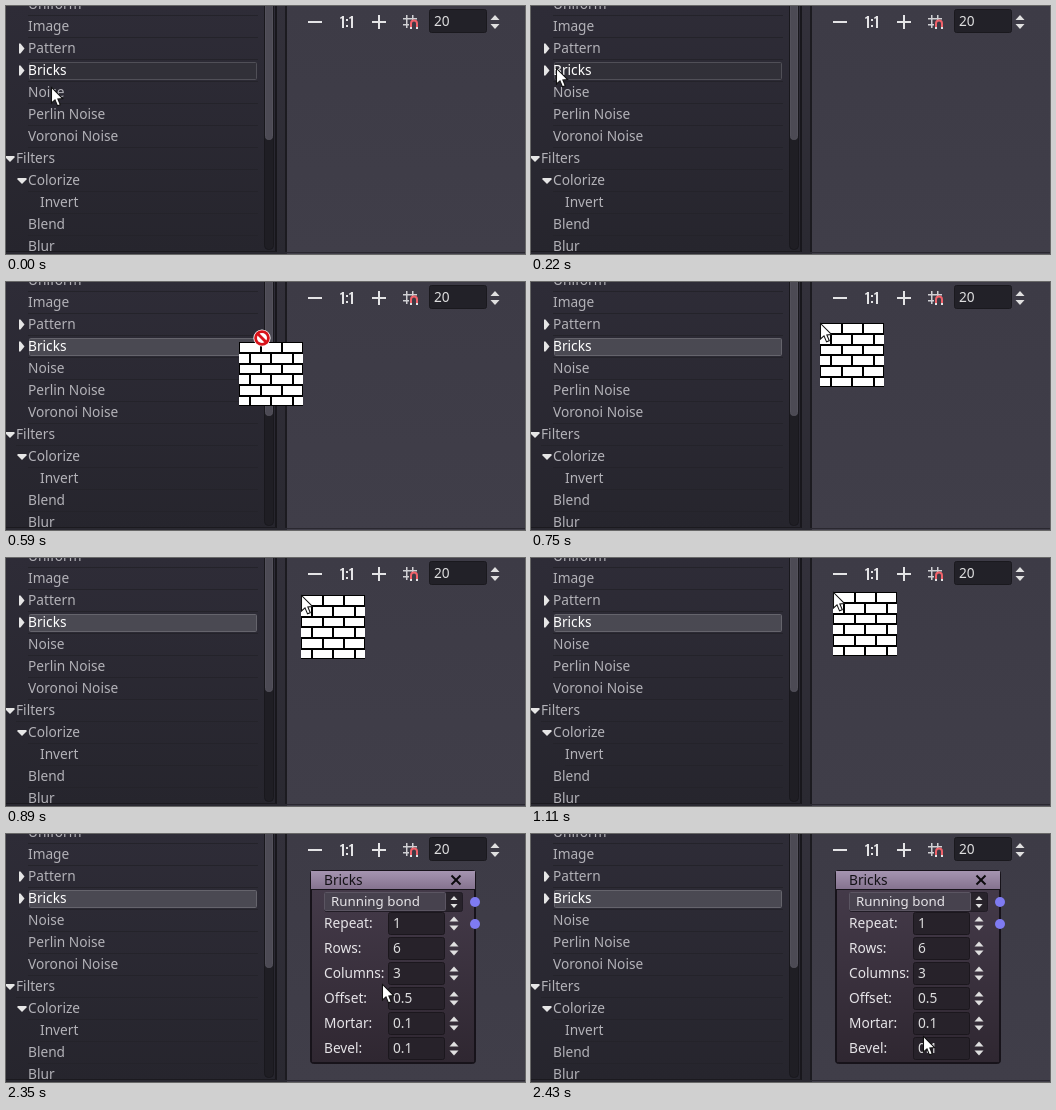
Recreate the animation shown at these times as an HTML page with a canvas. Size 519x248 px, loop 2510 ms.

```html
<!DOCTYPE html>
<html lang="en">
<head>
<meta charset="utf-8">
<title>Drag a node into the graph</title>
<style>
  html, body { margin: 0; width: 100%; height: 100%; overflow: hidden; background: #3d3b46; }
  canvas { display: block; }
</style>
</head>
<body>
<canvas id="stage" width="519" height="248"></canvas>
<script>
const ctx = document.getElementById('stage').getContext('2d');
const LOOP = 2510, SELECT = 450, DRAG = 530, ENTER_GRAPH = 670, DROP = 1650;

// Pointer positions: [start ms, x, y], each held until the next
const pointer = [
  [0, 45.5, 81.5], [80, 24.5, 63.5], [220, 25.5, 62.5], [450, 73.5, 66.5],
  [530, 165, 61], [590, 256, 56], [670, 279.5, 48.5], [750, 289.5, 41.5],
  [830, 292.5, 39.5], [890, 295.5, 37.5], [970, 298.5, 36.5], [1050, 300.5, 35.5],
  [1110, 302.5, 34.5], [2350, 376.5, 150.5], [2430, 392.5, 202.5]
];

// Tree rows: [label, text x, arrow]
const tree = [
  ['Uniform', 22], ['Image', 22], ['Pattern', 22, 'closed'], ['Bricks', 22, 'closed'],
  ['Noise', 22], ['Perlin Noise', 22], ['Voronoi Noise', 22], ['Filters', 10, 'open'],
  ['Colorize', 22, 'open'], ['Invert', 34], ['Blend', 22], ['Blur', 22]
];

const params = [['Repeat:', 1], ['Rows:', 6], ['Columns:', 3], ['Offset:', 0.5], ['Mortar:', 0.1], ['Bevel:', 0.1]];

function rect(x, y, w, h, fill) {
  ctx.fillStyle = fill;
  ctx.fillRect(x, y, w, h);
}

function box(x, y, w, h, fill, border, radius = 2) {
  ctx.beginPath();
  ctx.roundRect(x + 0.5, y + 0.5, w - 1, h - 1, radius);
  ctx.fillStyle = fill;
  ctx.fill();
  ctx.strokeStyle = border;
  ctx.lineWidth = 1;
  ctx.stroke();
}

function shade(x0, y0, x1, y1, ...colors) {
  const g = ctx.createLinearGradient(x0, y0, x1, y1);
  colors.forEach((c, i) => g.addColorStop(i / (colors.length - 1), c));
  return g;
}

function text(str, x, y, color, size = 13.7) {
  ctx.font = size + 'px "Noto Sans", sans-serif';
  ctx.fillStyle = color;
  ctx.fillText(str, x, y);
}

function polygon(fill, ...points) {
  ctx.beginPath();
  points.forEach(([x, y]) => ctx.lineTo(x, y));
  ctx.closePath();
  ctx.fillStyle = fill;
  ctx.fill();
}

function line(color, width, ...points) {
  ctx.beginPath();
  points.forEach(([x, y]) => ctx.lineTo(x, y));
  ctx.strokeStyle = color;
  ctx.lineWidth = width;
  ctx.stroke();
}

function disc(x, y, r, fill) {
  ctx.beginPath();
  ctx.arc(x, y, r, 0, 7);
  ctx.fillStyle = fill;
  ctx.fill();
}

function spinner(x, y, gap = 2, size = 4.5) {
  for (const s of [-1, 1])
    polygon('#e0e0e0', [x - size, y + s * gap], [x + size, y + s * gap], [x, y + s * (gap + size + 0.5)]);
}

function drawTree(selected) {
  rect(0, 0, 269, 246, shade(0, 0, 0, 248, '#2e2c37', '#26252d'));
  tree.forEach(([label, x, arrow], i) => {
    const y = i * 22 - 2, active = label === 'Bricks';
    rect(x, y + 11, 252 - x, 1, '#24232a');
    if (active) box(23, y - 8, 228, 18, selected ? '#4a4952' : '#313038', selected ? '#65646c' : '#504f57', 1);
    if (arrow === 'closed') polygon('#e6e6e6', [x - 9, y - 4.5], [x - 7.5, y - 4.5], [x - 3.5, y + 0.5], [x - 7.5, y + 5.5], [x - 9, y + 5.5]);
    if (arrow === 'open') polygon('#e6e6e6', [x - 10.5, y - 2], [x - 1.5, y - 2], [x - 1.5, y - 0.5], [x - 6, y + 4], [x - 10.5, y - 0.5]);
    text(label, x, y + 5, active ? '#ffffff' : '#b3b2b8');
  });
  box(258, -6, 10, 250, '#1f1e24', '#19181d', 4);
  box(259, -6, 8, 140, '#4c4a54', '#53515b', 3);
}

function drawGraph() {
  rect(281, 0, 238, 248, shade(0, 0, 0, 248, '#3d3b46', '#403e49'));
  rect(0, 0, 281, 248, shade(0, 0, 0, 248, '#33313b', '#2a2931'));
  rect(269, 0, 2, 246, '#18171c');
  rect(279, 0, 2, 246, '#1c1b20');
  rect(0, 245, 270, 1, '#1b1a1f');
  rect(281, 246, 238, 1, '#2a2830');
}

function drawToolbar() {
  const white = '#e4e4e6';
  rect(302, 15, 14, 2, white);
  rect(366, 15, 14, 2, white);
  rect(372, 9, 2, 14, white);
  for (const x of [337, 346]) {
    rect(x - 1, 10, 2, 12, white);
    line(white, 1.5, [x - 2.7, 12.3], [x, 10.7]);
  }
  rect(340, 13, 2, 2, white);
  rect(340, 19, 2, 2, white);

  // Grid with a magnet
  rect(400, 9, 1.5, 13, '#d0d0d3');
  rect(406, 9, 1.5, 5, '#d0d0d3');
  rect(397, 12, 14, 1.5, '#d0d0d3');
  rect(397, 18, 6, 1.5, '#d0d0d3');
  ctx.beginPath();
  ctx.moveTo(405, 21);
  ctx.arc(408, 17.5, 3, Math.PI, 0);
  ctx.lineTo(411, 21);
  ctx.strokeStyle = '#f0626a';
  ctx.lineWidth = 2;
  ctx.stroke();
  rect(404, 21, 2, 2, white);
  rect(410, 21, 2, 2, white);

  box(423, 3, 58, 24, '#222128', '#1a191e');
  text('20', 428, 20, '#dededf');
  spinner(489, 16);
}

function drawNode() {
  box(304, 36, 166, 194, '#17131a', '#17131a', 3);
  rect(305, 37, 164, 18, shade(0, 37, 0, 55, '#a594b0', '#85738f'));
  rect(306, 56, 162, 172, shade(0, 56, 0, 228, '#443a49', '#2f2731'));
  text('Bricks', 318, 51, '#131115');
  line('#0c0b0d', 2, [445.5, 41.5], [454.5, 50.5]);
  line('#0c0b0d', 2, [454.5, 41.5], [445.5, 50.5]);

  box(318, 58, 139, 20, '#28232b', '#211c25');
  box(318, 58, 122, 19, '#47424e', '#5b5562', 1);
  text('Running bond', 325, 72, '#e6e4e8', 13.3);
  spinner(448, 68, 2, 3.5);

  params.forEach(([label, value], i) => {
    const y = 89 + i * 25;
    text(label, 318, y + 5, '#e6e4e8');
    box(382, y - 11, 57, 23, '#27222a', '#1b171d');
    text(value, 387, y + 5, '#dededf');
    spinner(448, y + 0.5, 2, 4.5);
  });
  for (const y of [68, 90]) disc(469, y, 5, '#7f7bf2');
}

function drawBricks(x, y) {
  const w = 64 / 3, h = 64 / 6;
  // Brick faces snap to whole pixels, leaving the mortar crisp
  const face = (from, size) => {
    const a = Math.round(from + 1.2);
    return [a, Math.round(from + size - 0.7) - a];
  };
  ctx.save();
  ctx.translate(Math.floor(x), Math.floor(y));
  ctx.beginPath();
  ctx.rect(0, 0, 64, 64);
  ctx.clip();
  rect(0, 0, 64, 64, '#000');
  for (let row = 0; row < 6; row++)
    for (let col = 0; col < 4; col++) {
      const [left, width] = face((col - row % 2 / 2) * w, w);
      const [top, height] = face(row * h, h);
      rect(left, top, width, height, '#fff');
    }
  ctx.restore();
}

function drawArrow(x, y) {
  ctx.save();
  ctx.translate(x, y);
  ctx.scale(1.06, 1.06);
  polygon('#fff', [0, 0], [0, 14.6], [3.3, 11.7], [5.7, 17.3], [8.3, 16.2], [6, 10.8], [10.5, 10.5]);
  ctx.strokeStyle = '#111';
  ctx.lineWidth = 1;
  ctx.stroke();
  ctx.restore();
}

function drawForbidden(x, y) {
  disc(x, y, 8.6, '#fff');
  disc(x, y, 7.8, '#d8131a');
  disc(x, y, 5, '#fff');
  line('#d8131a', 2.8, [x - 4.5, y - 4.5], [x + 4.5, y + 4.5]);
}

function render(t) {
  const [, x, y] = pointer.findLast(p => p[0] <= t);
  const blocked = t >= DRAG && t < ENTER_GRAPH;
  drawGraph();
  drawTree(t >= SELECT);
  rect(0, 245, 270, 1, '#1b1a1f');
  drawToolbar();
  if (t >= DROP) drawNode();
  else if (blocked) drawBricks(x - 23, y + 4); // preview trails the fast pointer
  else if (t >= DRAG) drawBricks(x, y);
  (blocked ? drawForbidden : drawArrow)(x, y);
}

const start = performance.now();
function tick() {
  render((performance.now() - start) % LOOP);
  requestAnimationFrame(tick);
}
tick();
</script>
</body>
</html>
```
